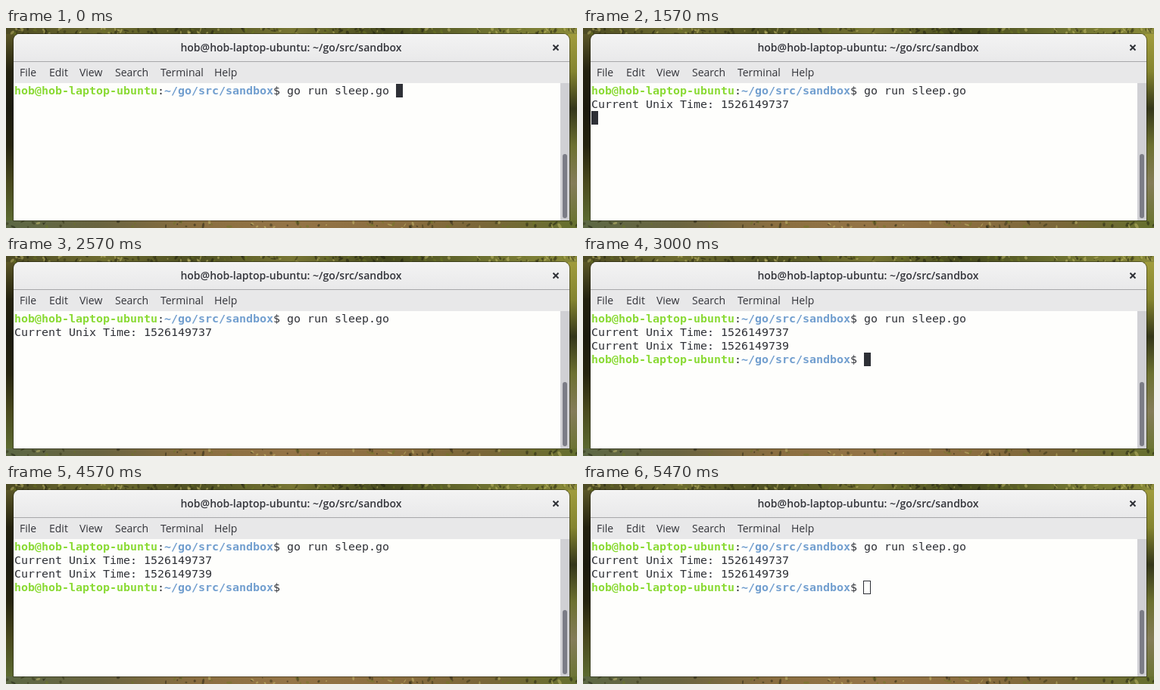
These frames come from a looping animation (754 by 265 pixels, 5.51 s). An HTML page with a canvas:

```html
<!DOCTYPE html>
<html lang="en">
<head>
<meta charset="utf-8">
<title>Terminal</title>
<style>
html, body { margin: 0; width: 100%; height: 100%; overflow: hidden; background: #3a3a1c; }
canvas { display: block; }
</style>
</head>
<body>
<canvas id="stage" width="754" height="265"></canvas>
<script>
const W = 754, H = 265, LOOP = 5510;
const CELL = 9, ROW = 18, LEFT = 11, TOP = 74;
const INK = '#2e3036', GREEN = '#8ada34', BLUE = '#729fcf', PAPER = '#fefefc';
const USER = 'hob', HOST = 'hob-laptop-ubuntu', DIR = '~/go/src/sandbox';
const UI = '"Open Sans", "Noto Sans", sans-serif';
const MONO = '14.95px "DejaVu Sans Mono", monospace';

const ENTER = 370, FIRST = 1030, DONE = 3000, BLUR = 5430, BLINK = 600;

const ctx = document.getElementById('stage').getContext('2d');

function random(seed) {
  return () => (seed = (seed * 16807) % 2147483647) / 2147483647;
}

function box(c, x, y, w, h, fill) {
  c.fillStyle = fill;
  c.fillRect(x, y, w, h);
}

function blend(c, x0, y0, x1, y1, colors) {
  const g = c.createLinearGradient(x0, y0, x1, y1);
  colors.forEach((color, i) => g.addColorStop(i / (colors.length - 1), color));
  return g;
}

function label(c, text, x, y, font, align = 'left') {
  c.font = font;
  c.textAlign = align;
  c.fillStyle = '#33343a';
  c.fillText(text, x, y);
}

// Soft woodland tones around the window
function drawWoods(c) {
  box(c, 0, 0, W, 12, blend(c, 0, 0, W, 0,
    ['#4c4a22', '#6e6c30', '#4e5022', '#787634', '#45491e', '#6c7030', '#8a8a3a']));
  box(c, 0, 250, W, 15, blend(c, 0, 0, W, 0,
    ['#5c6844', '#6a6440', '#8a6e40', '#947446', '#8c6e40', '#7a6638', '#65702e']));
  box(c, 0, 8, 12, 247, blend(c, 0, 8, 0, 255,
    ['#5a5626', '#24220f', '#1c1b0e', '#26240f', '#4a4a1e', '#5c6a30']));
  box(c, 742, 8, 12, 247, blend(c, 0, 8, 0, 255,
    ['#a09c3c', '#84842f', '#34361a', '#6c7030', '#847c58', '#6c7434']));
  const rnd = random(41);
  const tones = ['#15150a', '#d0c874', '#6c7a24', '#2c2c12'];
  c.globalAlpha = 0.45;
  for (let i = 0; i < 260; i++) {
    const x = rnd() * W, y = i % 3 ? rnd() * 8 : 256 + rnd() * 9;
    c.fillStyle = tones[Math.floor(rnd() * tones.length)];
    c.beginPath();
    c.ellipse(x, y, 1 + rnd() * 3, 0.6 + rnd() * 1.4, rnd() * 3, 0, 7);
    c.fill();
  }
  c.globalAlpha = 1;
}

function drawWindow(c) {
  c.fillStyle = 'rgba(20, 20, 10, 0.45)';
  c.beginPath();
  c.roundRect(9, 7, 736, 249, [9, 9, 0, 0]);
  c.fill();

  c.save();
  c.beginPath();
  c.roundRect(10, 8, 734, 247, [8, 8, 0, 0]);
  c.clip();
  box(c, 10, 8, 734, 36, blend(c, 0, 8, 0, 44, ['#f3f3f3', '#e9e9ea']));
  box(c, 10, 8, 734, 1, '#fbfbfb');
  box(c, 10, 44, 734, 1, '#a8a8aa');
  box(c, 10, 45, 734, 28, '#e8e8e9');
  box(c, 10, 73, 722, 182, PAPER);
  box(c, 732, 73, 12, 182, '#d0d0d4');
  c.fillStyle = '#7b7c86';
  c.beginPath();
  c.roundRect(735, 167, 6, 85, 3);
  c.fill();
  c.restore();

  label(c, `${USER}@${HOST}: ${DIR}`, 376.5, 31, `600 14px ${UI}`, 'center');
  const menu = { File: 18, Edit: 57, View: 97, Search: 144, Terminal: 204, Help: 275 };
  for (const name in menu) label(c, name, menu[name], 64, `14px ${UI}`);

  c.strokeStyle = INK;
  c.lineWidth = 2;
  c.beginPath();
  c.moveTo(722.5, 22.5);
  c.lineTo(729.5, 29.5);
  c.moveTo(729.5, 22.5);
  c.lineTo(722.5, 29.5);
  c.stroke();
}

// Writes on the character grid and returns the next column
function write(text, row, col = 0, color = INK, bold = false) {
  ctx.font = (bold ? 'bold ' : '') + MONO;
  ctx.textAlign = 'left';
  ctx.fillStyle = color;
  for (const ch of text) {
    ctx.fillText(ch, LEFT + col++ * CELL, TOP + row * ROW + 14);
  }
  return col;
}

function prompt(row) {
  let col = write(`${USER}@${HOST}`, row, 0, GREEN, true);
  col = write(':', row, col);
  col = write(DIR, row, col, BLUE, true);
  return write('$ ', row, col);
}

function drawCursor(row, col, t) {
  const x = LEFT + col * CELL, y = TOP + row * ROW;
  if (t >= BLUR) {
    ctx.strokeStyle = INK;
    ctx.lineWidth = 1;
    ctx.strokeRect(x - 0.5, y + 0.5, CELL, ROW - 1);
  } else if (t < ENTER || Math.floor((t - ENTER) / BLINK) % 2 === 0) {
    box(ctx, x, y, CELL, ROW, INK);
  }
}

const backdrop = document.createElement('canvas');
backdrop.width = W;
backdrop.height = H;
drawWoods(backdrop.getContext('2d'));
drawWindow(backdrop.getContext('2d'));

function draw(t) {
  ctx.drawImage(backdrop, 0, 0);
  let row = 0;
  let col = write('go run sleep.go ', 0, prompt(0));
  if (t >= ENTER) {
    row = 1;
    col = 0;
  }
  if (t >= FIRST) write('Current Unix Time: 1526149737', row++);
  if (t >= DONE) {
    write('Current Unix Time: 1526149739', row++);
    col = prompt(row);
  }
  drawCursor(row, col, t);
}

const start = performance.now();
function frame() {
  draw((performance.now() - start) % LOOP);
  requestAnimationFrame(frame);
}
frame();
</script>
</body>
</html>
```
